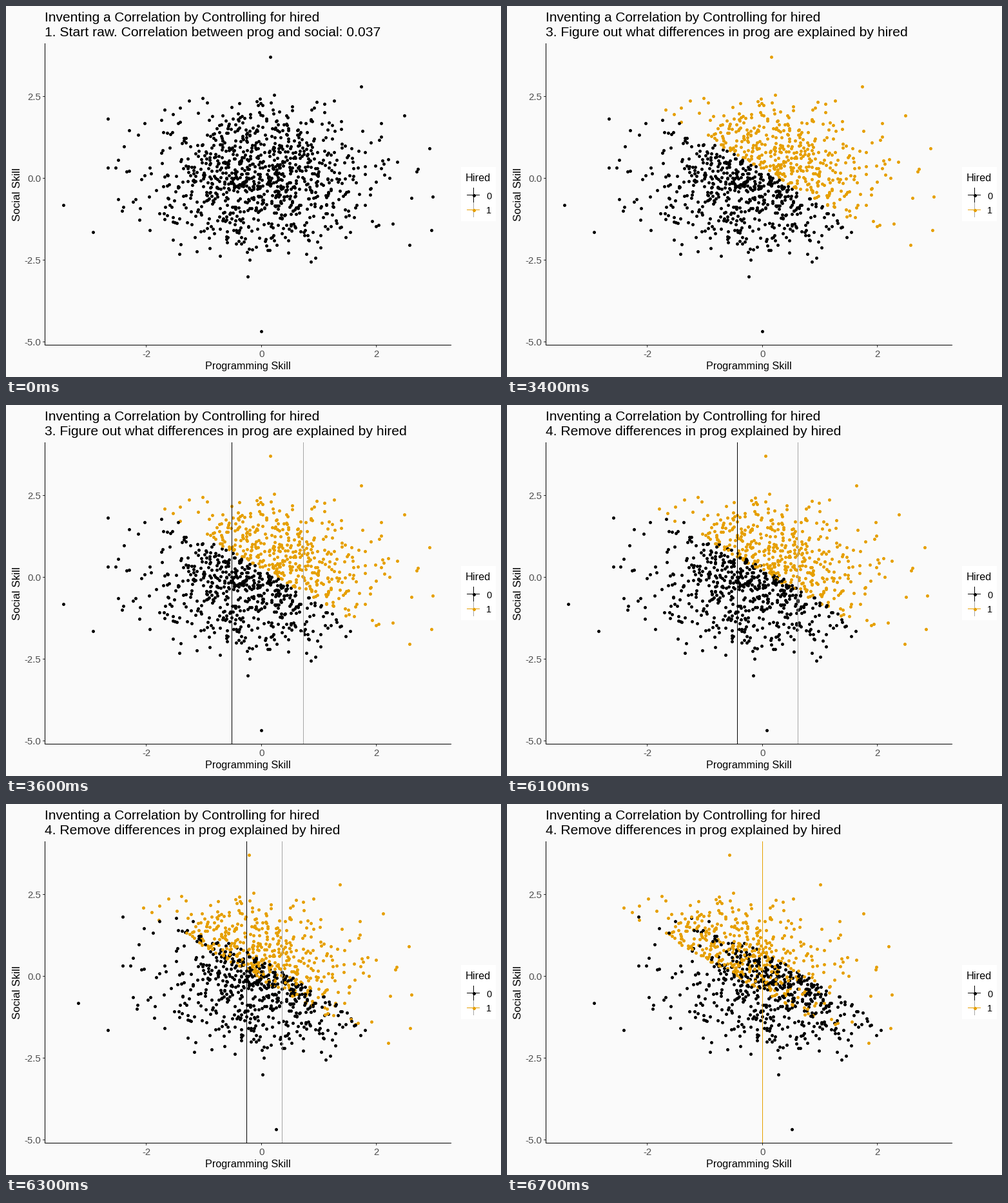
A matplotlib script that plays this animation: 768x576 px, repeating every 8000 ms.

```python
import matplotlib.pyplot as plt
import numpy as np
from matplotlib.animation import FuncAnimation
from matplotlib.patches import Rectangle

W, H, DPI = 768, 576, 96
PT = 72 / DPI                      # points per pixel
X0, Y0, SX, SY = 396.3, 267.5, 89.25, 50.8
BLACK, GOLD, GREY, TICK_TEXT = "#000000", "#E69F00", "#A6A6A6", "#4D4D4D"
MEANS = (-0.513, 0.7305)           # mean programming skill of each group
CUT = 0.25                         # hired when the two skills add up to more
COUNT = 1000

TITLE = "Inventing a Correlation by Controlling for hired"
STEPS = [
    (0, "1. Start raw. Correlation between prog and social: 0.037"),
    (5, "2. Separate data by the values of hired."),
    (34, "3. Figure out what differences in prog are explained by hired"),
    (60, "4. Remove differences in prog explained by hired"),
]
SPLIT_ON, LINES_ON, MOVE_FROM, MOVE_STEPS = 5, 36, 59, 8

# The farthest points are fixed, all others are normally distributed.
EXTREMES = [
    (0.16, 3.70), (0.0, -4.68), (-3.44, -0.82), (-2.92, -1.66),
    (2.98, -0.57), (2.96, -1.59), (2.93, 0.91), (2.58, -2.04),
    (-2.66, 1.81), (1.74, 2.80), (2.49, 1.91), (-0.23, -3.01),
]


def to_px(x, y):
    return X0 + SX * x, Y0 - SY * y


def centre(v):
    """Middle of the pixel that holds v."""
    return np.floor(v) + 0.5


rng = np.random.default_rng(12)
cloud = rng.normal(size=(2 * COUNT, 2))
cloud = cloud[np.hypot(*cloud.T) < 2.8][:COUNT - len(EXTREMES)]
prog, social = rng.permutation(np.vstack([EXTREMES, cloud])).T
hired = prog + social > CUT
group_mean = np.where(hired, MEANS[1], MEANS[0])
split_colors = np.where(hired, GOLD, BLACK)
raw_colors = np.full(COUNT, BLACK)

plt.rcParams["font.family"] = "Liberation Sans"
fig = plt.figure(figsize=(W / DPI, H / DPI), dpi=DPI, facecolor="#FAFAFA")
ax = fig.add_axes([0, 0, 1, 1])
ax.set_xlim(0, W)
ax.set_ylim(H, 0)
ax.axis("off")


def line(xs, ys, color=BLACK, z=2):
    return ax.plot(xs, ys, color=color, lw=PT, solid_capstyle="butt",
                   snap=False, zorder=z)[0]


def label(x, y, text, px, color=BLACK, ha="left", **kw):
    return ax.text(x, y, text, fontsize=px * PT, color=color, ha=ha,
                   va="baseline", **kw)


def dots(xs, ys, colors):
    return ax.scatter(xs, ys, s=(5 * PT) ** 2, c=colors, linewidths=0,
                      snap=False, zorder=3)


# Axes
line([60.5, 60.5], [58, 527])
line([60, 691], [526.5, 526.5])
for v in (2.5, 0, -2.5, -5):
    y = to_px(0, v)[1]
    line([57, 60], [centre(y)] * 2, "#333333")
    label(54, y + 5.5, f"{v:.1f}", 15, TICK_TEXT, "right")
for v in (-2, 0, 2):
    x = to_px(v, 0)[0]
    line([centre(x)] * 2, [527, 530], "#333333")
    label(x, 545, str(v), 15, TICK_TEXT, "center")
label(375, 564, "Programming Skill", 16.3, ha="center")
label(22, 293, "Social Skill", 17, ha="center", rotation=90,
      rotation_mode="anchor")

# Legend
ax.add_patch(Rectangle((706, 250), 54, 84, fc="white", lw=0))
label(713, 272, "Hired", 16.3)
for y, name, color, stem in ((293.5, "0", BLACK, BLACK), (316.5, "1", GOLD, GREY)):
    line([725.5, 725.5], [y - 11.5, y + 11.5], stem)
    line([715, 735], [y, y], color)
    dots([725.5], [y], [color])
    label(745, y + 6, name, 14.5)

label(60, 24, TITLE, 20.85)
subtitle = label(60, 47, "", 21.1)
points = dots(*to_px(prog, social), raw_colors)
mean_lines = [line([0, 0], [58, 526], c, 4) for c in (BLACK, GREY)]


def draw(n):
    subtitle.set_text([text for start, text in STEPS if n >= start][-1])
    t = np.clip((n - MOVE_FROM) / MOVE_STEPS, 0, 1)
    p = (1 - np.cos(np.pi * t)) / 2          # sine in and out
    xy = to_px(prog - p * group_mean, social)
    points.set_offsets(centre(np.column_stack(xy)))
    points.set_facecolor(split_colors if n >= SPLIT_ON else raw_colors)
    for ln, mean in zip(mean_lines, MEANS):
        x = centre(to_px(mean * (1 - p), 0)[0])
        ln.set_xdata([x, x])
        ln.set_visible(n >= LINES_ON)
    mean_lines[1].set_color(GOLD if t == 1 else GREY)
    return [subtitle, points, *mean_lines]


anim = FuncAnimation(fig, draw, frames=80, interval=100, repeat=True,
                     repeat_delay=0, blit=False)
plt.show()
```
